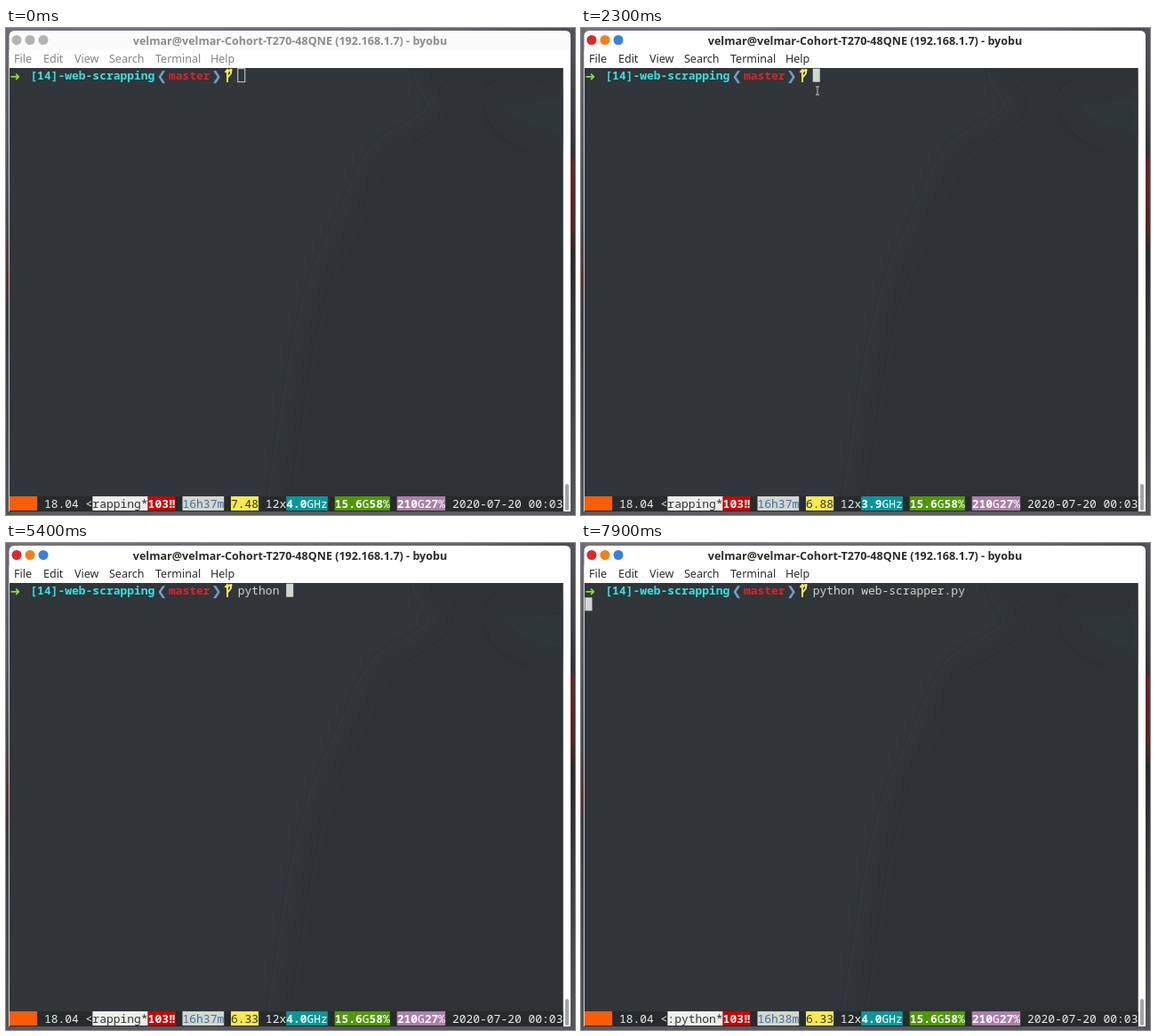
These frames come from a looping animation (640 by 548 pixels, 8000 ms). An HTML page:

```html
<!DOCTYPE html>
<html lang="en">
<head>
<meta charset="utf-8">
<title>Terminal</title>
<style>
  html, body { margin: 0; width: 100%; height: 100%; overflow: hidden; background: #4c4b51; }
  svg { display: block; width: 640px; height: 548px; }
  text { white-space: pre; }
  .mono { font: 12.97px "Noto Sans Mono", "DejaVu Sans Mono", monospace; }
  .sign { font: bold 14px "DejaVu Sans", sans-serif; }
  .bold { font-weight: bold; }
  .menu { font: 12.5px "Noto Sans", "Open Sans", sans-serif; fill: #2b2b2b; }
  #title { font: bold 12.55px "Noto Sans", "Open Sans", sans-serif; fill: #2b2b2b; text-anchor: middle; }
  .idle #bar { fill: #fbfbfb; }
  .idle #title { fill: #8c8c8c; }
  .idle .menu { fill: #858585; }
  .idle .dot { fill: #b4b4b4; }
  #caret { fill: #d3d7cf; }
  .idle #caret { fill: none; stroke: #d3d7cf; }
</style>
</head>
<body>
<svg id="stage" viewBox="0 0 640 548">
  <defs>
    <linearGradient id="top">
      <stop offset="0" stop-color="#74747d"/>
      <stop offset=".8" stop-color="#66666d"/>
      <stop offset="1" stop-color="#4b4a50"/>
    </linearGradient>
    <linearGradient id="left" x2="0" y2="1">
      <stop offset="0" stop-color="#6b6b75"/>
      <stop offset=".42" stop-color="#4a474e"/>
      <stop offset=".52" stop-color="#5a3034"/>
      <stop offset=".58" stop-color="#3b393f"/>
      <stop offset="1" stop-color="#55555b"/>
    </linearGradient>
    <linearGradient id="right" x2="0" y2="1">
      <stop offset="0" stop-color="#55545b"/>
      <stop offset=".26" stop-color="#34323a"/>
      <stop offset=".28" stop-color="#642828"/>
      <stop offset=".41" stop-color="#552626"/>
      <stop offset=".46" stop-color="#2b292d"/>
      <stop offset="1" stop-color="#55555a"/>
    </linearGradient>
    <filter id="soft"><feGaussianBlur stdDeviation="9"/></filter>
    <clipPath id="screen"><path d="M4 45H626.500V544H4Z"/></clipPath>
  </defs>
  <path fill="#5a5a60" d="M0 0H640V548H0Z"/>
  <path fill="url(#top)" d="M0 0H640V6H0Z"/>
  <path fill="url(#left)" d="M0 0H5V548H0Z"/>
  <path fill="url(#right)" d="M634 0H640V548H634Z"/>
  <path id="bar" fill="#fff" d="M3.500 544V9Q3.500 3 10 3H629Q635 3 635 9V544Z"/>
  <path fill="#fff" d="M3.500 25H635V544H3.500Z"/>
  <g clip-path="url(#screen)">
    <path fill="#30363a" d="M4 44H627V544H4Z"/>
    <path fill="#2d3335" filter="url(#soft)"
      d="M660 30H465Q470 70 495 84Q480 108 428 132Q408 152 396 186L358 270Q340 320 328 390L300 570H660Z"/>
    <path fill="#2f3538" filter="url(#soft)" d="M548 72L640 66V132Q580 130 555 100Z"/>
  </g>
  <path fill="#272b2d" d="M4 527H626.500V544H4Z"/>
  <rect x="629" y="513" width="4" height="30" rx="2" fill="#a2a4a5"/>
  <circle class="dot" cx="12" cy="13.500" r="5.500" fill="#dc2a2a"/>
  <circle class="dot" cx="27" cy="13.500" r="5.500" fill="#f08217"/>
  <circle class="dot" cx="42" cy="13.500" r="5.500" fill="#3b80dc"/>
  <text id="title" x="319.500" y="18.500">velmar@velmar-Cohort-T270-48QNE (192.168.1.7) - byobu</text>
  <g id="text"></g>
  <path fill="none" stroke="#fce94f" stroke-width="2" d="M249 61V48M246.500 50L249 47L251 49.500M249 56L253 51V46M250.500 47.500H254.500"/>
  <rect id="caret" width="8" height="15"/>
  <path id="mouse" fill="none" stroke="#c3c6c7" d="M-2-4.500H2M0-4.500V4.500M-2 4.500H2"/>
</svg>
<script>
const $ = id => document.getElementById(id);
const LOOP = 8000, CELL = 7.78, LEFT = 4, ROW = 15.6, BASE = 58;
const colX = col => LEFT + col * CELL;
const layer = $('text');

function add(tag, attrs, content = '') {
  const el = document.createElementNS('http://www.w3.org/2000/svg', tag);
  for (const name in attrs) el.setAttribute(name, attrs[name]);
  el.textContent = content;
  return layer.appendChild(el);
}
const write = (col, y, text, fill = '#d3d7cf', bold = '') =>
  add('text', { x: colX(col), y, class: 'mono ' + bold, fill }, text);
const sign = (x, text, fill) => add('text', { x, y: 58.5, class: 'sign', fill }, text);
const block = (col, cols, fill) =>
  add('rect', { x: colX(col), y: 527, width: cols * CELL, height: 16, fill });
const status = (col, text, fill = '#fff', bold = '') => write(col, 539.5, text, fill, bold);

[[9, 'File'], [42, 'Edit'], [77, 'View'], [116, 'Search'], [168, 'Terminal'], [230, 'Help']]
  .forEach(([x, name]) => add('text', { x, y: 39, class: 'menu' }, name));

// Prompt
sign(4.5, '➜', '#8ae234');
write(3, BASE, '[14]-web-scrapping', '#34e2e2', 'bold');
sign(169.5, '❮', '#729fcf');
write(23, BASE, 'master', '#df2424', 'bold');
sign(231, '❯', '#729fcf');
const command = write(33, BASE, '');

// Status line
[[0, 4, '#fb5d06'], [12, 8, '#eeeeec'], [20, 4, '#cc0000'], [25, 6, '#d3d7cf'], [32, 4, '#fce94f'],
 [40, 6, '#06989a'], [47, 8, '#4e9a06'], [56, 7, '#ad7fa8']].forEach(b => block(...b));
status(5, '18.04 <', '#eeeeec');
const task = status(12, '', '#2e3436');
status(20, '103‼', '#fff', 'bold');
const uptime = status(25, '', '#3f6f9f');
const load = status(32, '', '#2e3436');
status(37, '12x', '#eeeeec');
const speed = status(40, '', '#fff', 'bold');
status(43, 'GHz');
status(47, '15.6', '#fff', 'bold');
status(51, 'G');
status(52, '58', '#fff', 'bold');
status(54, '%');
status(56, '210', '#fff', 'bold');
status(59, 'G');
status(60, '27', '#fff', 'bold');
status(62, '%');
status(64, '2020-07-20 00:03', '#eeeeec');

const FOCUS = 2000, ENTER = 7000;
const KEYS = [3800, 4000, 4300, 4500, 4700, 4900, 5100, 5600, 5700, 5800];
const COMPLETE = 6000, LINE = 'python web-scrapper.py ';
const PATH = [[1000, 62, 132], [1200, 100, 95.5], [1800, 266, 70.5]];

function typed(t) {
  return t >= COMPLETE ? LINE : LINE.slice(0, KEYS.filter(k => t >= k).length);
}

function mouseAt(t) {
  const next = PATH.findIndex(p => p[0] > t);
  if (next < 0) return PATH[PATH.length - 1].slice(1);
  const [t0, x0, y0] = PATH[next - 1], [t1, x1, y1] = PATH[next];
  const u = (t - t0) / (t1 - t0);
  return [x0 + (x1 - x0) * u, y0 + (y1 - y0) * u];
}

function draw(now) {
  const t = Math.floor(now % LOOP / 100) * 100;
  const line = typed(t), entered = t >= ENTER;
  $('stage').classList.toggle('idle', t < FOCUS);
  command.textContent = line;
  $('caret').setAttribute('x', entered ? colX(0) + .5 : colX(33 + line.length));
  $('caret').setAttribute('y', 45.7 + (entered ? ROW : 0));
  task.textContent = t < 7400 ? 'rapping*' : ':python*';
  uptime.textContent = t < 5900 ? '16h37m' : '16h38m';
  load.textContent = t < 700 ? '7.48' : t < 5000 ? '6.88' : '6.33';
  speed.textContent = t >= 700 && t < 3200 ? '3.9' : '4.0';

  const shown = t >= PATH[0][0] && t < KEYS[0];
  $('mouse').style.display = shown ? '' : 'none';
  if (shown) $('mouse').setAttribute('transform', `translate(${mouseAt(t)})`);
  requestAnimationFrame(draw);
}
requestAnimationFrame(draw);
</script>
</body>
</html>
```
